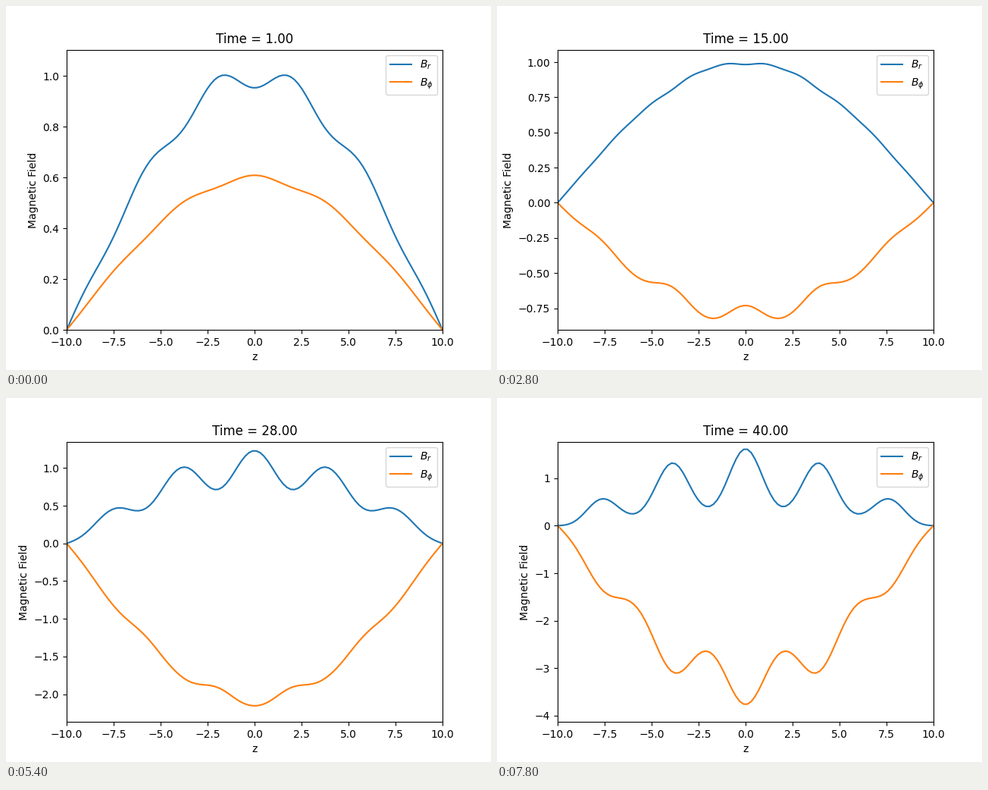
A matplotlib script for the animation above (8 s loop, 640 by 480 pixels).

```python
import numpy as np
import matplotlib.pyplot as plt
from matplotlib.animation import FuncAnimation

# Mean-field dynamo on a slab, fields vanish at both ends
ALPHA, ETA, SHEAR = 0.0097, 0.01, 0.1
FRAMES, INTERVAL = 40, 200
LEAD, SUBSTEPS = 4, 20

z = np.linspace(-10, 10, 100)
dz = z[1] - z[0]
alpha = ALPHA * np.sin(np.pi * z / 2)


def diffuse(b):
    out = np.zeros_like(b)
    out[1:-1] = ETA * (b[2:] - 2 * b[1:-1] + b[:-2]) / dz**2
    return out


def rate(state):
    br, bphi = state
    change = np.array([
        diffuse(br) - np.gradient(alpha * bphi, dz),
        diffuse(bphi) - SHEAR * br,
    ])
    change[:, [0, -1]] = 0
    return change


def advance(state, duration=1):
    dt = duration / SUBSTEPS
    for _ in range(SUBSTEPS):
        mid = state + dt / 2 * rate(state)
        state = state + dt * rate(mid)
    return state


def solve():
    start = np.cos(np.pi * z / 20)
    start[[0, -1]] = 0
    state = advance(np.array([start, start]), LEAD)
    history = [state]
    for _ in range(FRAMES - 1):
        state = advance(state)
        history.append(state)
    return history


history = solve()

fig, ax = plt.subplots(figsize=(6.4, 4.8), dpi=100)
line_r, = ax.plot(z, history[0][0], label=r"$B_r$")
line_phi, = ax.plot(z, history[0][1], label=r"$B_\phi$")
ax.set_xlim(-10, 10)
ax.set_xlabel("z")
ax.set_ylabel("Magnetic Field")
ax.legend(loc="upper right")


def update(i):
    state = history[i]
    line_r.set_ydata(state[0])
    line_phi.set_ydata(state[1])
    ax.set_ylim(1.1 * state.min(), 1.1 * state.max())
    ax.set_title(f"Time = {i + 1:.2f}")
    return line_r, line_phi


anim = FuncAnimation(fig, update, frames=FRAMES, interval=INTERVAL,
                     init_func=lambda: update(0), repeat=True, repeat_delay=0)
plt.show()
```
